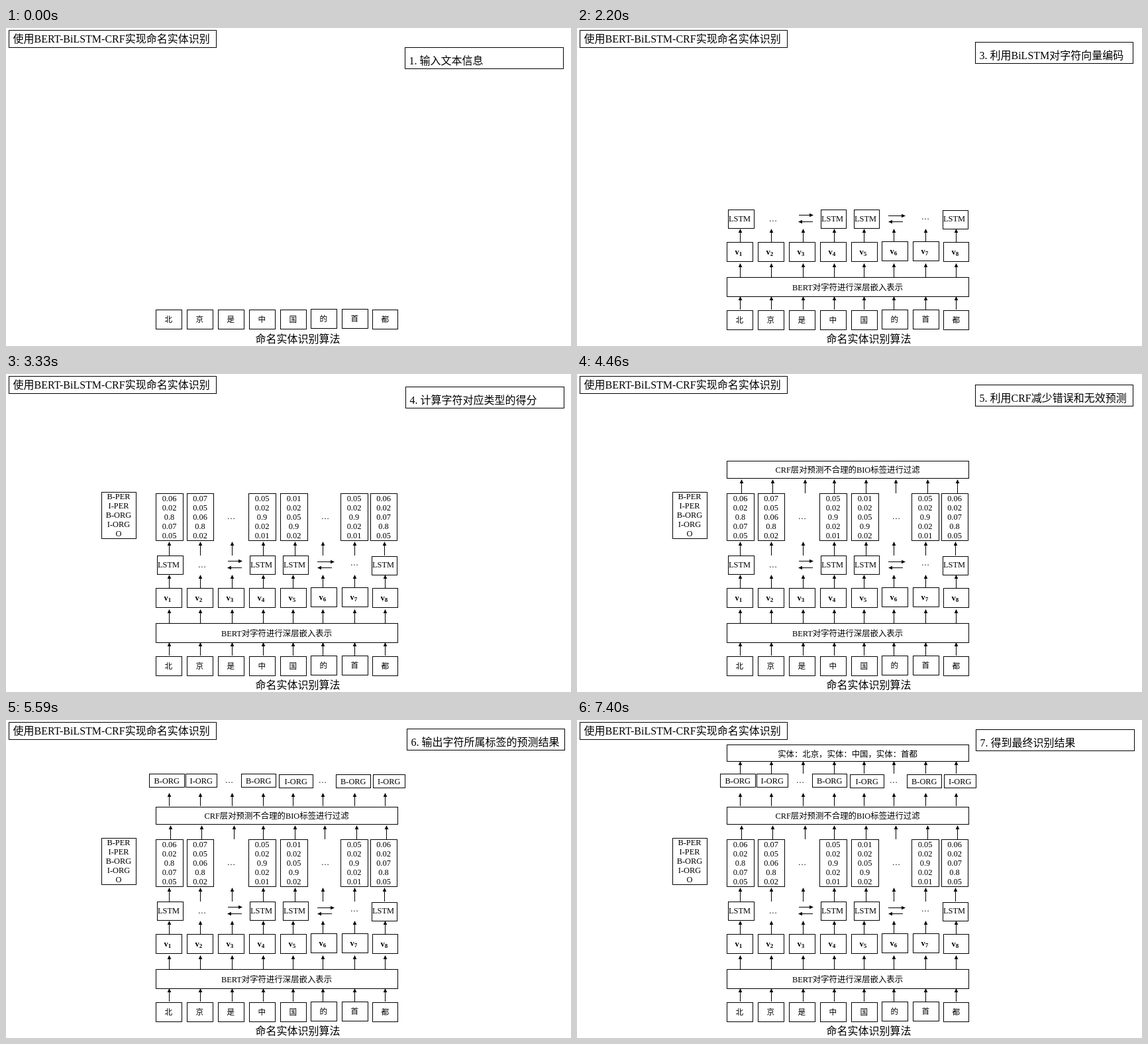
Write an HTML page that moves like this. It is 853x480 px and loops after 7.85 s.

```html
<!DOCTYPE html>
<html lang="zh-CN">
<head>
<meta charset="utf-8">
<title>BERT-BiLSTM-CRF</title>
<style>
html, body { margin: 0; width: 100%; height: 100%; overflow: hidden; background: #fff; }
svg { display: block; width: 853px; height: 480px; }
text { font: 12.4px "Liberation Serif", "Noto Sans CJK SC", "Noto Sans CJK", serif; fill: #000; white-space: pre; }
text.big { font-size: 16px; }
text.small { font-size: 11.6px; }
text.mid { text-anchor: middle; }
text.vec { font-size: 12.5px; font-weight: bold; }
.vec tspan { font-size: 9px; }
rect { fill: #fff; stroke: #000; }
.arrow { stroke: #000; }
</style>
</head>
<body>
<svg id="stage" viewBox="0 0 853 480"></svg>
<script>
const NS = 'http://www.w3.org/2000/svg';
const LOOP = 7850, FIRST = 1070, STEP = 1130;
const stage = document.getElementById('stage');
const css = document.head.appendChild(document.createElement('style'));

function add(parent, tag, attrs = {}, content = '') {
  const el = document.createElementNS(NS, tag);
  for (const key in attrs) el.setAttribute(key, attrs[key]);
  el.textContent = content;
  return parent.appendChild(el);
}
const startOf = i => i ? FIRST + STEP * (i - 1) : 0;
const percent = i => (startOf(i) / LOOP * 100).toFixed(4) + '%';

// Edges are the outermost pixel rows and columns of the outline.
const box = (g, l, t, r, b) =>
  add(g, 'rect', { x: l + .5, y: t + .5, width: r - l, height: b - t });
const label = (g, x, y, str, cls = 'mid') => add(g, 'text', { x, y, class: cls }, str);

function arrow(g, x1, y1, x2, y2) {
  const len = Math.hypot(x2 - x1, y2 - y1);
  const angle = Math.atan2(y2 - y1, x2 - x1) * 180 / Math.PI;
  const a = add(g, 'g', { transform: `translate(${x1} ${y1}) rotate(${angle})` });
  add(a, 'path', { class: 'arrow', d: `M0 0H${len - 4}` });
  add(a, 'path', { d: `M${len} 0l-6 -2.8v5.6z` });
}
const rise = (g, xs, from, to) => xs.forEach(x => arrow(g, x + .5, from, x + .5, to));

// A group visible from step i up to step end (or the end of the loop).
function layer(i, end = 7) {
  const name = `show${i}to${end}`;
  const hide = end < 7 ? `${percent(end)} { visibility: hidden }` : '';
  const before = i ? '0% { visibility: hidden }' : '';
  css.textContent += `@keyframes ${name} { ${before} ${percent(i)} { visibility: visible } ${hide} }
    .${name} { animation: ${name} ${LOOP}ms step-end infinite }`;
  return add(stage, 'g', { class: name });
}

// The two lower rows sit one pixel higher until the third step.
css.textContent += `@keyframes settle { 0% { transform: translateY(-1px) } ${percent(2)}, 100% { transform: none } }
  .settle { animation: settle ${LOOP}ms step-end infinite }`;

const RIGHT = 591;
const lefts = [226, 273, 320, 367, 414, 460, 507, 553];
const stems = [246, 293, 341, 388, 433, 478, 526, 572];
const lift = k => k === 5 || k === 6 ? 1 : 0;
const cell = (g, k, top) =>
  box(g, lefts[k], top - lift(k), Math.min(lefts[k] + 39, RIGHT), top + 29 - lift(k));

// Title and input characters
box(stage, 4, 3, 317, 29);
label(stage, 10.5, 22, '使用BERT-BiLSTM-CRF实现命名实体识别', 'big');
label(stage, 376.5, 475, '命名实体识别算法', 'big');
const chars = add(stage, 'g', { class: 'settle' });
[...'北京是中国的首都'].forEach((c, k) => {
  cell(chars, k, 426);
  label(chars, lefts[k] + 19.3, 444.5 - lift(k), c, 'mid small');
});

// BERT embedding
const bert = layer(1);
box(bert, 226, 376, RIGHT, 405);
label(bert, 408.5, 395.5, 'BERT对字符进行深层嵌入表示');
rise(bert, stems, 425, 405);
rise(bert, stems, 376, 355);
const vecs = add(bert, 'g', { class: 'settle' });
lefts.forEach((x, k) => {
  cell(vecs, k, 323);
  const v = label(vecs, x + 12.5, 342 - lift(k), 'v', 'vec');
  add(v, 'tspan', { dy: 2 }, k + 1);
});

// BiLSTM
const lstm = layer(2);
rise(lstm, stems, 323, 303);
[[228, 39, 274], [368, 38, 274], [418, 38, 274], [552, 38, 275]].forEach(([x, w, y]) => {
  box(lstm, x, y, x + w, y + 28);
  label(lstm, x + 1, 292, 'LSTM', '');
});
label(lstm, 296, 291.5, '…');
label(lstm, 526, 288.5, '…');
arrow(lstm, 335, 282.5, 357, 282.5);
arrow(lstm, 356, 292.5, 334, 292.5);
arrow(lstm, 470, 283.5, 496, 283.5);
arrow(lstm, 492, 292.5, 470, 292.5);

// Scores for each tag
const scores = layer(3);
const column = (x, y, lines) => lines.split(' ').forEach((s, n) => label(scores, x, y + n * 14, s));
box(scores, 144, 178, 196, 248);
column(170, 188.5, 'B-PER I-PER B-ORG I-ORG O');
[
  [226, 41, '0.06 0.02 0.8 0.07 0.05'],
  [273, 40, '0.07 0.05 0.06 0.8 0.02'],
  [366, 41, '0.05 0.02 0.9 0.02 0.01'],
  [414, 41, '0.01 0.02 0.05 0.9 0.02'],
  [505, 41, '0.05 0.02 0.9 0.02 0.01'],
  [550, 40, '0.06 0.02 0.07 0.8 0.05']
].forEach(([x, w, lines]) => {
  box(scores, x, 180, x + w, 251);
  column(x + w / 2, 191.5, lines);
});
label(scores, 340, 219, '…');
label(scores, 482, 219, '…');
rise(scores, [246, 293, 341, 388, 436, 478, 526, 571], 274, 253);

// CRF filter
const crf = layer(4);
box(crf, 226, 131, RIGHT, 157);
label(crf, 408.5, 149, 'CRF层对预测不合理的BIO标签进行过滤');
rise(crf, [248, 295, 344, 388, 436, 481, 529, 574], 180, 159);

// Predicted tags
const tags = layer(5);
[[216, 53, 'B'], [271, 47, 'I'], [355, 52, 'B'], [412, 51, 'I'], [498, 52, 'B'], [554, 48, 'I']].forEach(([x, w, t]) => {
  const y = x > 400 ? 82 : 81;
  box(tags, x, y, x + w, y + 20);
  label(tags, x + w / 2 + .3, y + 14.5, t + '-ORG');
});
label(tags, 337, 94.5, '…');
label(tags, 478, 94.5, '…');
rise(tags, stems, 130, 110);

// Final entities
const result = layer(6);
box(result, 226, 37, RIGHT, 62);
label(result, 408.5, 55.5, '实体：北京，实体：中国，实体：首都');
rise(result, stems, 81, 62);

// Step captions: left, top, right, text
[
  [602, 29, 841, '输入文本信息'],
  [602, 22, 840, '利用BERT获取字符嵌入表示'],
  [601, 21, 839, '利用BiLSTM对字符向量编码'],
  [603, 19, 842, '计算字符对应类型的得分'],
  [601, 16, 839, '利用CRF减少错误和无效预测'],
  [605, 13, 843, '输出字符所属标签的预测结果'],
  [602, 14, 841, '得到最终识别结果']
].forEach(([l, t, r, str], i) => {
  const g = layer(i, i + 1);
  box(g, l, t, r, t + 32);
  label(g, l + 6.5, t + 25.5, `${i + 1}. ${str}`, 'big');
});
</script>
</body>
</html>
```
